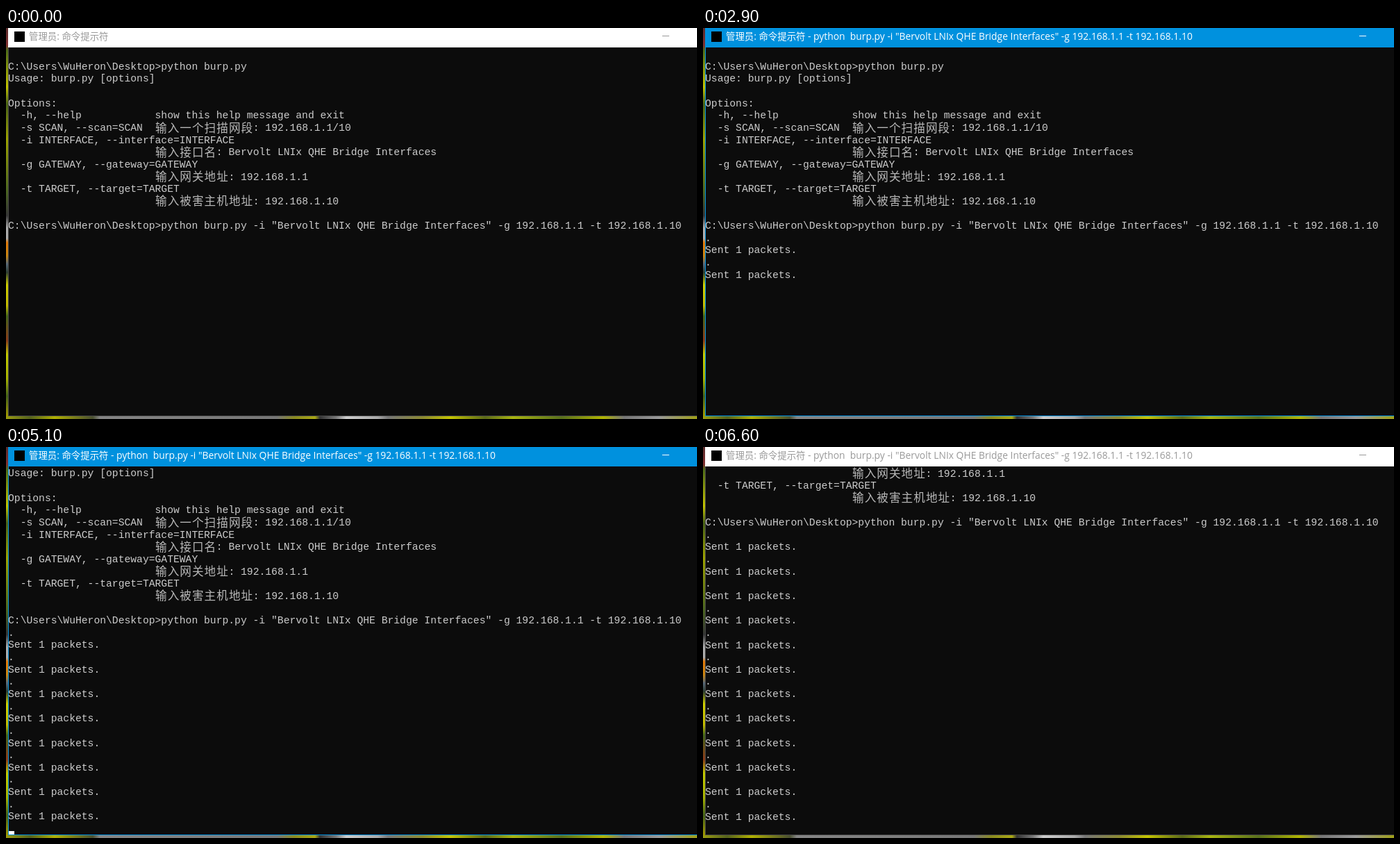
An HTML page that plays this animation: 995x563 px, repeating every 6700 ms.

```html
<!DOCTYPE html>
<html lang="zh-CN">
<head>
<meta charset="utf-8">
<title>命令提示符</title>
<style>
  html, body { margin: 0; width: 100%; height: 100%; overflow: hidden; }
  #stage {
    position: relative; width: 995px; height: 563px; overflow: hidden;
    background: linear-gradient(90deg, #9a9c10, #55621c 35px, #b0b000 70px, #4a5030 125px, #858585 135px,
      #777 390px, #8a8a20 415px, #aaa814 445px, #333 452px, #777 475px, #ccc 490px, #aaa 535px,
      #777 550px, #8c8a30 600px, #c4c400 640px, #5c6a18 690px, #a8b410 730px, #59701c 800px,
      #b0b400 860px, #777 890px, #999 940px, #a0a018);
  }
  #edge {
    position: absolute; left: 0; top: 0; width: 3px; height: 559px;
    background: linear-gradient(#5a2c2c, #803030 25px, #4c6a18 32px, #c0c000 85px, #476018 110px, #9aa000 160px,
      #4a6420 235px, #333 270px, #aaa 288px, #aaa 303px, #e07808 309px, #c88410 328px, #567 340px,
      #2c3c30 352px, #cccc00 370px, #c0b800 400px, #436418 415px, #8a3a18 450px, #c0c800 470px,
      #a4b000 505px, #436018 530px, #a09800);
  }
  #window {
    --frame: #0091de; --ink: #fff;
    position: absolute; left: 3px; top: 0; width: 992px; height: 559px; overflow: hidden; background: #0c0c0c;
  }
  #window.idle { --frame: #fff; --ink: #999; }
  #window::after {
    content: ""; position: absolute; inset: 28px 0 0; pointer-events: none;
    border: solid var(--frame); border-width: 0 0 1px 1px;
  }
  #window.idle::after { border-color: #444; }
  #bar {
    position: absolute; inset: 0 0 auto; height: 28px; background: var(--frame); color: var(--ink);
    font: 13.86px/24px "Open Sans", "Noto Sans", sans-serif; white-space: pre; z-index: 1;
  }
  #icon { position: absolute; left: 9px; top: 5px; width: 15px; height: 15px; background: #000; }
  #caption { position: absolute; left: 30px; top: 0; }
  #caption b { font: 13.4px/0 "Noto Sans CJK SC", "Noto Sans CJK", sans-serif; }
  #minimise { position: absolute; left: 942px; top: 11px; width: 10px; height: 1px; background: var(--ink); }
  #screen { position: absolute; left: 0; top: 28.9px; width: 992px; height: 529.4px; overflow: hidden; }
  #lines {
    position: absolute; left: 0; top: 1.3px; color: #ccc; white-space: pre;
    font: 14.703px/17.647px "Liberation Mono", monospace; font-variant-ligatures: none;
  }
  #lines div { height: 17.647px; }
  #lines b {
    position: relative; left: .5px; top: 1.6px; color: #b8b8b8; letter-spacing: 1.047px;
    font: 300 16.6px/0 "Noto Sans CJK SC", "Noto Sans CJK", sans-serif;
  }
  #caret { position: absolute; width: 9px; height: 5px; background: #fff; }
  #pointer { position: absolute; left: 0; top: 0; width: 14px; height: 20px; overflow: visible; }
</style>
</head>
<body>
<div id="stage">
  <div id="edge"></div>
  <div id="window">
    <div id="bar">
      <div id="icon"></div>
      <div id="caption"><b>管理员</b>: <b>命令提示符</b><span id="command"></span></div>
      <div id="minimise"></div>
    </div>
    <div id="screen">
      <div id="lines"></div>
      <div id="caret"></div>
    </div>
  </div>
  <svg id="pointer"><path d="M0 0V15.5L3.6 12.2L6.2 18L8.8 16.9L6.3 11.2H11Z" fill="#fff" stroke="#000" stroke-width=".8"/></svg>
</div>
<script>
  const LOOP = 6700, CELL = 8.8235, ROW = 17.647, LAST_ROW = 29, PROMPT_ROW = 14;
  const $ = id => document.getElementById(id);
  const win = $("window"), lines = $("lines"), caret = $("caret"), pointer = $("pointer"), command = $("command");

  const adapter = "Bervolt LNIx QHE Bridge Interfaces";
  const args = `-i "${adapter}" -g 192.168.1.1 -t 192.168.1.10`;
  const prompt = "C:\\Users\\WuHeron\\Desktop>python burp.py";
  const indent = " ".repeat(24);
  const text = [
    "",
    prompt,
    "Usage: burp.py [options]",
    "",
    "Options:",
    "  -h, --help".padEnd(24) + "show this help message and exit",
    "  -s SCAN, --scan=SCAN".padEnd(24) + "输入一个扫描网段: 192.168.1.1/10",
    "  -i INTERFACE, --interface=INTERFACE",
    indent + "输入接口名: " + adapter,
    "  -g GATEWAY, --gateway=GATEWAY",
    indent + "输入网关地址: 192.168.1.1",
    "  -t TARGET, --target=TARGET",
    indent + "输入被害主机地址: 192.168.1.10",
    "",
    `${prompt} ${args}`
  ];
  for (let i = 0; i < 12; i++) text.push(".", "Sent 1 packets.");

  const rows = text.map(line => {
    const row = document.createElement("div");
    row.innerHTML = line.replace(/[\u4e00-\u9fff]+/g, "<b>$&</b>");
    return lines.appendChild(row);
  });

  // [time, packets sent so far]
  const packets = [[2900, 2], [3600, 4], [4300, 5], [4400, 6], [5000, 7], [5100, 8],
                   [5700, 9], [5800, 10], [6500, 11], [6600, 12]];
  const caretOn = [[400, 800], [1400, 1900], [2600, 2900], [3400, 4200], [5100, 5700]];
  // [time, x, y]
  const path = [[100, 700, 545], [400, 655, 430], [800, 629.5, 367], [1900, 629.5, 367], [2300, 803, 408]];

  const within = (t, from, to) => t >= from && t < to;

  function placePointer(t) {
    const next = path.findIndex(p => p[0] > t);
    pointer.style.display = next > 0 ? "" : "none";
    if (next < 1) return;
    const [t0, x0, y0] = path[next - 1], [t1, x1, y1] = path[next];
    const k = (t - t0) / (t1 - t0);
    pointer.style.transform = `translate(${x0 + (x1 - x0) * k}px, ${y0 + (y1 - y0) * k}px)`;
  }

  function draw(t) {
    const running = t >= 800;
    const sent = packets.reduce((n, [at, count]) => t >= at ? count : n, 0);
    const cursorRow = running ? PROMPT_ROW + 1 + 2 * sent : PROMPT_ROW;
    const scroll = Math.max(0, cursorRow - LAST_ROW);

    win.className = within(t, 400, 6600) ? "" : "idle";
    command.textContent = running ? ` - python  burp.py ${args}` : "";
    rows.forEach((row, i) => row.style.visibility = i <= PROMPT_ROW + 2 * sent ? "" : "hidden");
    lines.style.transform = `translateY(${-scroll * ROW}px)`;

    caret.style.display = caretOn.some(([from, to]) => within(t, from, to)) ? "" : "none";
    caret.style.left = (running ? 0 : text[PROMPT_ROW].length * CELL) + "px";
    caret.style.top = (cursorRow - scroll + 1) * ROW - 5.2 + "px";
    placePointer(t);
  }

  const start = performance.now();
  function tick() {
    draw((performance.now() - start) % LOOP);
    requestAnimationFrame(tick);
  }
  tick();
</script>
</body>
</html>
```
